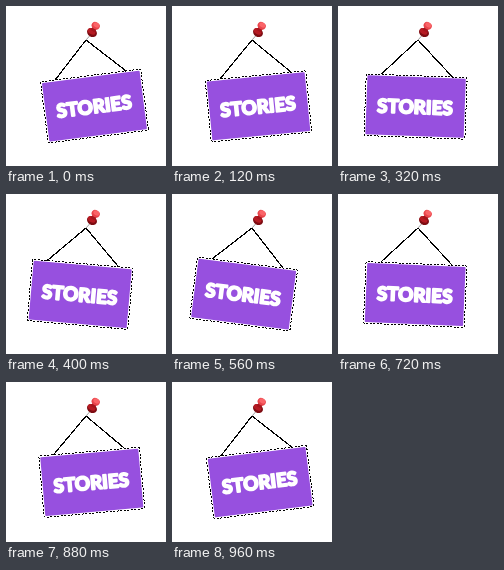
Recreate the animation shown at these times as an HTML page. Size 160x160 px, loop 1000 ms.

```html
<!DOCTYPE html>
<html lang="en">
<head>
<meta charset="utf-8">
<title>Swinging sign</title>
<style>
html, body { margin: 0; width: 100%; height: 100%; overflow: hidden; background: #fff; }
svg { display: block; width: 100vw; height: 100vh; }
text { font: 700 18.6px Lato, "Open Sans", sans-serif; letter-spacing: .2px; }
</style>
</head>
<body>
<svg viewBox="0 0 160 160">
  <g id="sign">
    <path d="M-37 37L0 0L37 37" fill="none" stroke="#000" stroke-width="1.2" shape-rendering="crispEdges"/>
    <rect x="-50.5" y="35.8" width="101" height="61.6" rx="1.5" fill="#fff"
      stroke="#000" stroke-dasharray="2 1.5" shape-rendering="crispEdges"/>
    <rect x="-49.2" y="37.1" width="98.4" height="59" rx="1" fill="#9750df"/>
    <text x="-.4" y="73.6" text-anchor="middle" fill="#fff" stroke="#fff"
      stroke-width="2.1" stroke-linejoin="round">STORIES</text>
  </g>
  <g id="pin">
    <path d="M80 34L84 29.5" stroke="#888" stroke-width=".8"/>
    <ellipse cx="86" cy="26.6" rx="5.2" ry="4.2" transform="rotate(32 86 26.6)" fill="#7d0c12"/>
    <ellipse cx="85.6" cy="25.4" rx="4.2" ry="2.8" transform="rotate(32 85.6 25.4)" fill="#b51a22"/>
    <path d="M86.6 25.2L89.2 21" stroke="#a5141c" stroke-width="4.4"/>
    <ellipse cx="89.7" cy="19.7" rx="4.3" ry="3.5" transform="rotate(32 89.7 19.7)" fill="#e8434a"/>
    <ellipse cx="90.4" cy="19" rx="3.2" ry="2.4" transform="rotate(32 90.4 19)" fill="#fa6468"/>
  </g>
</svg>
<script>
const LOOP = 1000, STEP = 40, PEAK = 540, SWING = 7.3;
const sign = document.getElementById("sign");

// Cosine swing: out until PEAK, back by the end of the loop.
function angle(t) {
  const phase = t < PEAK ? t / PEAK : 1 + (t - PEAK) / (LOOP - PEAK);
  return -SWING * Math.cos(Math.PI * phase);
}

function draw(now) {
  const t = Math.floor((now % LOOP) / STEP) * STEP;
  sign.setAttribute("transform", `translate(80 34) rotate(${angle(t).toFixed(3)})`);
}

const start = performance.now();
function tick() {
  draw(performance.now() - start);
  requestAnimationFrame(tick);
}
tick();
</script>
</body>
</html>
```
